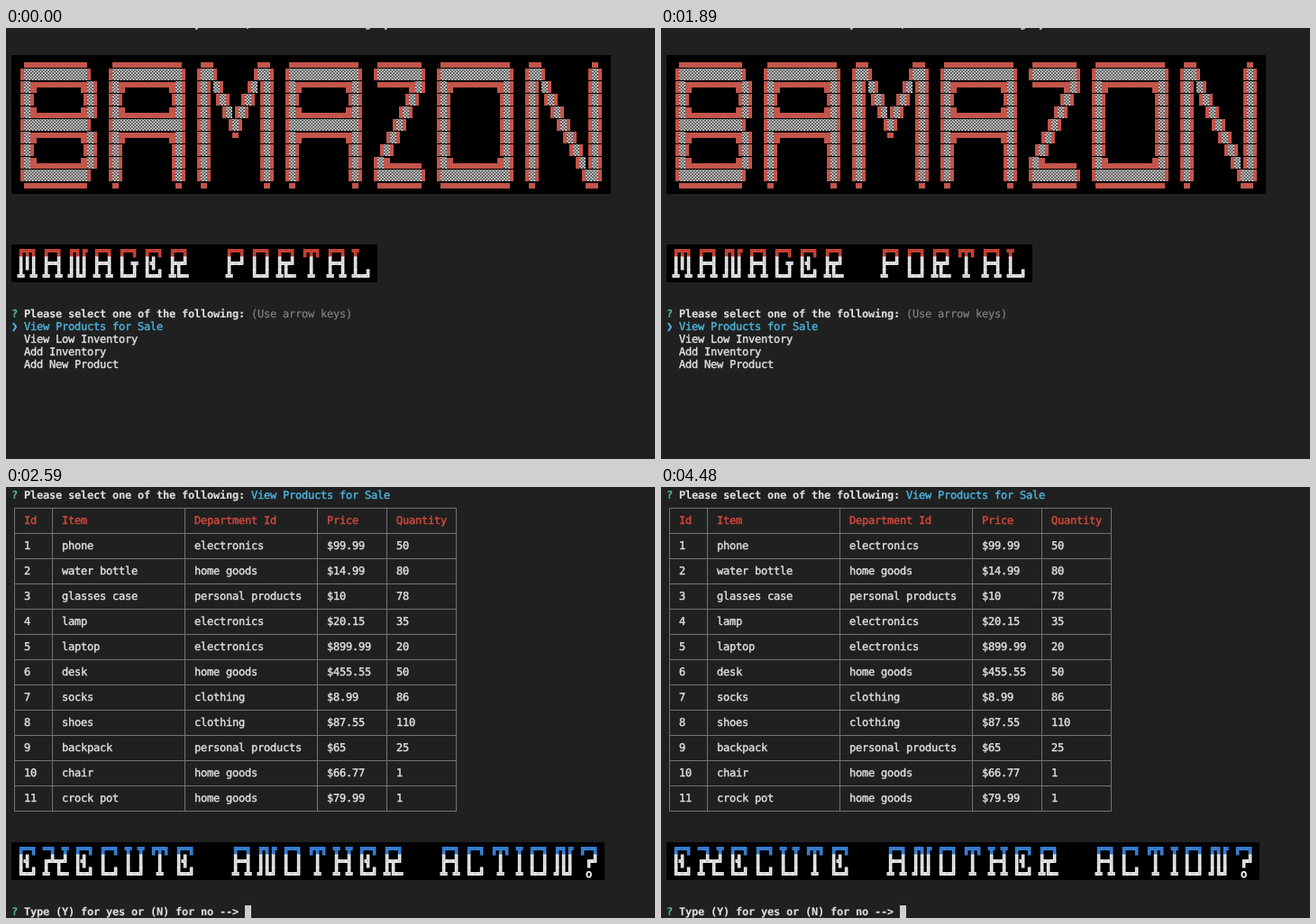
These frames come from a looping animation (720 by 478 pixels, 4.55 s). An HTML page:

```html
<!DOCTYPE html>
<html lang="en">
<head>
<meta charset="utf-8">
<title>Manager portal</title>
<style>
html, body { margin: 0; width: 100%; height: 100%; overflow: hidden; background: #202020; }
svg { display: block; width: 720px; height: 478px; }
text {
  font: 12px "DejaVu Sans Mono", "Liberation Mono", monospace;
  letter-spacing: -.224px;
  white-space: pre;
  text-rendering: geometricPrecision;
  fill: var(--c);
  stroke: var(--c);
  stroke-width: .4px;
}
text.bold { font-weight: bold; stroke-width: .1px; }
text.faint { stroke-width: .15px; }
text.box { stroke-width: .75px; }
</style>
</head>
<body>
<svg id="stage" viewBox="0 0 720 478">
  <defs>
    <pattern id="shade" x="6" y="2" width="3.5" height="3.5" patternUnits="userSpaceOnUse">
      <path d="M0 0h3.5v3.5h-3.5z" fill="#484848"/>
      <path d="M0 0h1.75v1.75h-1.75zM1.75 1.75h1.75v1.75h-1.75z" fill="#d6d6d6"/>
    </pattern>
  </defs>
</svg>
<script>
const CELL = 7, LINE = 14, LEFT = 6, TOP = 2;
const WHITE = '#e0e0e0', RED = '#c4554a', HEAD = '#d5483b', CYAN = '#4cb4dd',
      GREEN = '#55ba94', BLUE = '#3c8ae6', GREY = '#858585', RULE = '#747474';
const LOOP = 4550, CHOSEN_AT = 2520, RESULT_AT = 2590;

const stage = document.getElementById('stage');
const colX = col => LEFT + col * CELL;
const rowY = row => TOP + row * LINE;

function add(parent, tag, attrs = {}) {
  const node = document.createElementNS('http://www.w3.org/2000/svg', tag);
  for (const key in attrs) node.setAttribute(key, attrs[key]);
  return parent.appendChild(node);
}

function write(parent, row, col, string, color = WHITE, style = '') {
  const node = add(parent, 'text', { x: colX(col), y: rowY(row) + 11, class: style });
  node.style.setProperty('--c', color);
  node.textContent = string;
}

function block(parent, row, col, cols, rows, fill) {
  add(parent, 'rect', { x: colX(col), y: rowY(row), width: cols * CELL, height: rows * LINE, fill });
}

// Large shaded letters: [cells wide, rows]
const HUGE = {
  B: [14, ` ▄▄▄▄▄▄▄▄▄▄
▐░░░░░░░░░░▌
▐░█▀▀▀▀▀▀▀█░▌
▐░▌       ▐░▌
▐░█▄▄▄▄▄▄▄█░▌
▐░░░░░░░░░░▌
▐░█▀▀▀▀▀▀▀█░▌
▐░▌       ▐░▌
▐░█▄▄▄▄▄▄▄█░▌
▐░░░░░░░░░░▌
 ▀▀▀▀▀▀▀▀▀▀`],
  A: [14, ` ▄▄▄▄▄▄▄▄▄▄▄
▐░░░░░░░░░░░▌
▐░█▀▀▀▀▀▀▀█░▌
▐░▌       ▐░▌
▐░█▄▄▄▄▄▄▄█░▌
▐░░░░░░░░░░░▌
▐░█▀▀▀▀▀▀▀█░▌
▐░▌       ▐░▌
▐░▌       ▐░▌
▐░▌       ▐░▌
 ▀         ▀`],
  M: [14, ` ▄▄       ▄▄
▐░░▌     ▐░░▌
▐░▌░▌   ▐░▐░▌
▐░▌▐░▌ ▐░▌▐░▌
▐░▌ ▐░▐░▌ ▐░▌
▐░▌  ▐░▌  ▐░▌
▐░▌   ▀   ▐░▌
▐░▌       ▐░▌
▐░▌       ▐░▌
▐░▌       ▐░▌
 ▀         ▀`],
  Z: [10, ` ▄▄▄▄▄▄▄
▐░░░░░░░▌
 ▀▀▀▀▀█░▌
     ▐░▌
    ▐░▌
   ▐░▌
  ▐░▌
 ▐░▌
▐░█▄▄▄▄▄
▐░░░░░░░▌
 ▀▀▀▀▀▀▀`],
  O: [14, ` ▄▄▄▄▄▄▄▄▄▄▄
▐░░░░░░░░░░░▌
▐░█▀▀▀▀▀▀▀█░▌
▐░▌       ▐░▌
▐░▌       ▐░▌
▐░▌       ▐░▌
▐░▌       ▐░▌
▐░▌       ▐░▌
▐░█▄▄▄▄▄▄▄█░▌
▐░░░░░░░░░░░▌
 ▀▀▀▀▀▀▀▀▀▀▀`],
  N: [14, ` ▄▄        ▄
▐░░▌      ▐░▌
▐░▌░▌     ▐░▌
▐░▌▐░▌    ▐░▌
▐░▌ ▐░▌   ▐░▌
▐░▌  ▐░▌  ▐░▌
▐░▌   ▐░▌ ▐░▌
▐░▌    ▐░▌▐░▌
▐░▌     ▐░▐░▌
▐░▌      ▐░░▌
 ▀        ▀▀`]
};

// Part of a cell each block character fills: x, y, width, height
const FILL = {
  '▐': [3, 1, 4, 13], '▌': [0, 1, 4, 13], '█': [0, 2, 7, 12],
  '▀': [0, 2, 7, 6], '▄': [0, 8, 7, 6], '░': [0, 1, 7, 13]
};

function hugeTitle(parent, row, word) {
  let col = 1, solid = '', shade = '';
  for (const letter of word) {
    const [width, art] = HUGE[letter];
    art.split('\n').forEach((line, r) => [...line].forEach((ch, c) => {
      if (!FILL[ch]) return;
      const [dx, dy, w, h] = FILL[ch];
      const d = `M${colX(col + c) + dx} ${rowY(row + r) + dy}h${w}v${h}h${-w}z`;
      if (ch === '░') shade += d; else solid += d;
    }));
    col += width;
  }
  block(parent, row, 0, col, 11, '#000');
  add(parent, 'path', { d: shade, fill: 'url(#shade)' });
  add(parent, 'path', { d: solid, fill: RED, 'shape-rendering': 'crispEdges' });
}

// Three-row double-line letters
const CHROME = {
  A: '╔═╗/╠═╣/╩ ╩', C: '╔═╗/║  /╚═╝', E: '╔═╗/║╣ /╚═╝', G: '╔═╗/║ ╦/╚═╝',
  H: '╦ ╦/╠═╣/╩ ╩', I: '╦/║/╩', L: '╦  /║  /╩═╝', M: '╔╦╗/║║║/╩ ╩',
  N: '╔╗╔/║║║/╝╚╝', O: '╔═╗/║ ║/╚═╝', P: '╔═╗/╠═╝/╩  ', R: '╔═╗/╠╦╝/╩╚═',
  T: '╔╦╗/ ║ / ╩ ', U: '╦ ╦/║ ║/╚═╝', X: '═╗ ╦/╔╩╦╝/╩ ╚═', '?': '╔═╗/ ╔╝/ o ',
  ' ': '    /    /    '
};

function chromeTitle(parent, row, phrase, topColor) {
  const lines = [0, 1, 2].map(r =>
    ' ' + [...phrase].map(ch => CHROME[ch].split('/')[r] + ' ').join(''));
  block(parent, row, 0, lines[0].length, 3, '#000');
  lines.forEach((line, r) => write(parent, row + r, 0, line, r ? '#f4f4f4' : topColor, 'box'));
}

function prompt(parent, row, question) {
  write(parent, row, 0, '?', GREEN, 'bold');
  write(parent, row, 2, question, WHITE, 'bold');
}

const cursor = (parent, row, col) => block(parent, row, col, 1, 1, '#cfcfcf');

const QUESTION = 'Please select one of the following:';
const CHOICES = ['View Products for Sale', 'View Low Inventory', 'Add Inventory', 'Add New Product'];

const portal = add(stage, 'g'), menu = add(stage, 'g'),
      chosen = add(stage, 'g'), result = add(stage, 'g');

// Only the descenders of this scrolled line reach the stage
write(portal, -1, 29, 'y       ,' + ' '.repeat(18) + 'g  y');
hugeTitle(portal, 2, 'BAMAZON');
chromeTitle(portal, 17, 'MANAGER PORTAL', HEAD);
prompt(portal, 22, QUESTION);

write(menu, 22, 38, '(Use arrow keys)', GREY, 'faint');
write(menu, 23, 0, '❯', CYAN);
CHOICES.forEach((choice, i) => write(menu, 23 + i, 2, choice, i ? WHITE : CYAN));

write(chosen, 22, 38, CHOICES[0], CYAN);
cursor(chosen, 23, 0);

const TABLE = `Id|Item|Department Id|Price|Quantity
1|phone|electronics|$99.99|50
2|water bottle|home goods|$14.99|80
3|glasses case|personal products|$10|78
4|lamp|electronics|$20.15|35
5|laptop|electronics|$899.99|20
6|desk|home goods|$455.55|50
7|socks|clothing|$8.99|86
8|shoes|clothing|$87.55|110
9|backpack|personal products|$65|25
10|chair|home goods|$66.77|1
11|crock pot|home goods|$79.99|1`.split('\n').map(line => line.split('|'));
const EDGES = [0, 6, 27, 48, 59, 70];

function table(parent, row) {
  const midX = col => colX(col) + 3.5, midY = r => rowY(r) + 7.5;
  const last = row + TABLE.length * 2;
  let d = '';
  for (const col of EDGES) d += `M${midX(col)} ${midY(row)}V${midY(last)}`;
  for (let r = row; r <= last; r += 2) d += `M${midX(0)} ${midY(r)}H${midX(70)}`;
  add(parent, 'path', { d, stroke: RULE, fill: 'none' });
  TABLE.forEach((cells, i) => cells.forEach((cell, c) =>
    write(parent, row + 1 + i * 2, EDGES[c] + 2, cell, i ? WHITE : HEAD)));
}

prompt(result, 0, QUESTION);
write(result, 0, 38, CHOICES[0], CYAN);
table(result, 1);
chromeTitle(result, 28, 'EXECUTE ANOTHER ACTION?', BLUE);
prompt(result, 33, 'Type (Y) for yes or (N) for no -->');
cursor(result, 33, 37);

const show = (node, on) => { node.style.display = on ? '' : 'none'; };

function draw() {
  const t = performance.now() % LOOP;
  show(portal, t < RESULT_AT);
  show(menu, t < CHOSEN_AT);
  show(chosen, t >= CHOSEN_AT && t < RESULT_AT);
  show(result, t >= RESULT_AT);
  requestAnimationFrame(draw);
}
draw();
</script>
</body>
</html>
```
